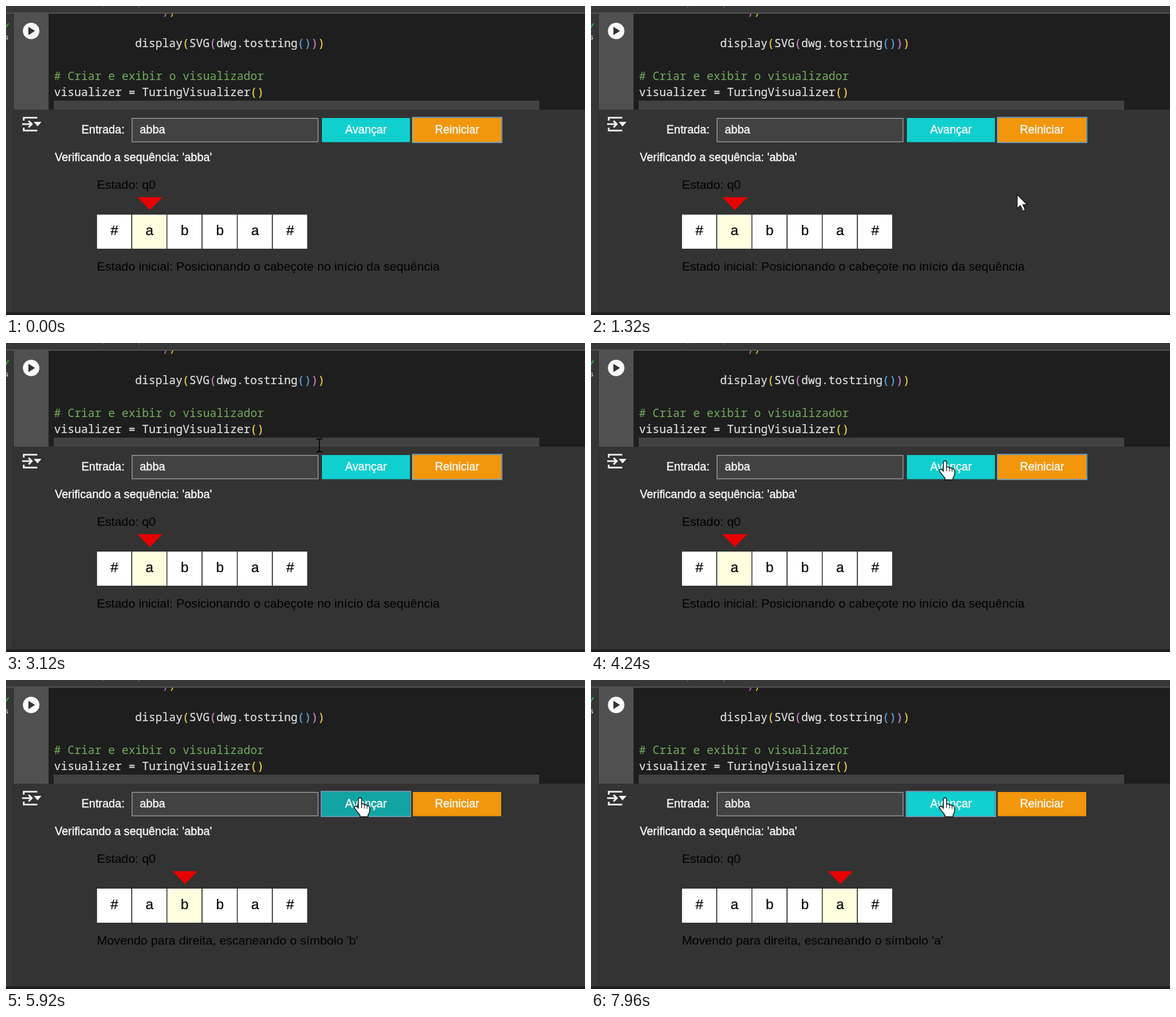
An HTML page for the animation above (8 s loop, 898 by 480 pixels).

```html
<!DOCTYPE html>
<html lang="pt">
<head>
<meta charset="utf-8">
<title>Turing machine</title>
<style>
  html, body { margin: 0; width: 100%; height: 100%; overflow: hidden; background: #333; }
  svg { display: block; width: 100vw; height: 100vh; }
  text { white-space: pre; }
  .code { font: 17.5px "Noto Sans Mono", "DejaVu Sans Mono", monospace; fill: #e2e2e2; }
  .ui { font: 17.7px "Liberation Sans", Arial, sans-serif; fill: #fafafa; }
  .ui text { stroke: #fafafa; stroke-width: .35; }
  .tape { font: 19.1px "Liberation Sans", Arial, sans-serif; fill: #000; }
  .cell { font-size: 21.8px; text-anchor: middle; stroke: #000; stroke-width: .2; }
  .mid { text-anchor: middle; }
  .y { fill: #ffd21f; } .p { fill: #d06fd0; } .b { fill: #3d9be8; } .g { fill: #72ad5c; }
</style>
</head>
<body>
<svg viewBox="0 0 898 480" preserveAspectRatio="none">
  <defs><clipPath id="editor"><rect x="66" y="12" width="832" height="149"/></clipPath></defs>
  <rect width="898" height="480" fill="#333"/>
  <rect width="11" height="480" fill="#363636"/>
  <rect x="11" y="11" width="1" height="465" fill="#2a2a2a"/>
  <rect width="898" height="10" fill="#383838"/>
  <rect y="10" width="898" height="2" fill="#505050"/>
  <path d="M151 0l-2 2M206 0v3" stroke="#777"/>
  <rect x="12" y="12" width="54" height="149" fill="#505050"/>
  <rect x="66" y="12" width="832" height="149" fill="#1e1e1e"/>
  <rect x="74" y="147" width="753" height="14" fill="#424242"/>
  <rect y="476" width="898" height="4" fill="#211d1f"/>
  <path d="M-2 31L0 33 4 27" fill="none" stroke="#2fae4a" stroke-width="2"/>
  <text class="ui" x="-2" y="52" style="font-size:11px">s</text>

  <circle cx="39" cy="38.700" r="12.800" fill="#fafafa"/>
  <path d="M34.700 32.200v13l10.300-6.500z" fill="#333"/>
  <g fill="none" stroke="#f4f4f4" stroke-width="2.600">
    <path d="M27.500 178v-4.500h21M27.500 189v4.500h21M25 183.500h15M35 178.500l5 5-5 5"/>
  </g>
  <path d="M43 180h12l-6 7z" fill="#f4f4f4"/>

  <g class="code" clip-path="url(#editor)">
    <text x="242" y="13.500"><tspan class="p">)</tspan><tspan class="y">)</tspan></text>
    <text x="200.300" y="64" stroke="#e2e2e2" stroke-width=".2">display<tspan class="y">(</tspan>SVG<tspan class="p">(</tspan>dwg.tostring<tspan class="b">()</tspan><tspan class="p">)</tspan><tspan class="y">)</tspan></text>
    <text class="g" x="74.500" y="114.500">#&#32;Criar e exibir o visualizador</text>
    <text x="74.500" y="140" stroke="#e2e2e2" stroke-width=".2">visualizer = TuringVisualizer<tspan class="y">()</tspan></text>
  </g>

  <g class="ui">
    <text x="117" y="198">Entrada:</text>
    <rect x="195.500" y="174.500" width="288.500" height="36.500" fill="#424242" stroke="#a0a0a0" stroke-width="1.200"/>
    <text x="207.500" y="198">abba</text>
    <rect id="step" x="490" y="174" width="136.500" height="37.500"/>
    <rect x="631" y="174" width="137" height="37.500" fill="#f2960b"/>
    <rect id="focus" y="173" width="138.500" height="39" fill="none" stroke="#7fb4d6" stroke-width="1.400"/>
    <text class="mid" x="558.300" y="198">Avançar</text>
    <text class="mid" x="699.600" y="198">Reiniciar</text>
    <text x="75.700" y="241">Verificando a sequência: 'abba'</text>
  </g>

  <g class="tape">
    <text x="140.900" y="284">Estado: q0</text>
    <path id="head" d="M-19.500 297h39L0 317z" fill="#e80000"/>
    <g id="cells"></g>
    <text id="note" x="140.900" y="411"></text>
  </g>

  <path id="arrow" d="M0 0V21.500L5 17 8.700 25.500 12.500 24 8.900 15.500H15.500Z" fill="#fff" stroke="#111" stroke-width="1.200"/>
  <path id="beam" d="M-5-10h4l1 1 1-1h4M0-9V9M-5 10h4l1-1 1 1h4" fill="none" stroke="#000" stroke-width="1.500"/>
  <g id="hand" stroke="#111">
    <path d="M-2.500 2.500Q-2.500 0 0 0T2.500 2.500V10Q6 8.500 7 11 10 10 11 12.500 15 12 15 15.500V21Q14.500 24 12.500 26.500V29.500H0V27L-8 17Q-9.500 13.500-6.500 13-4.500 13-2.500 16Z" fill="#fff" stroke-width="1.300"/>
    <path d="M2.500 10v6M7 11v5.500M11 12.500v4.500"/>
  </g>
</svg>
<script>
const LOOP = 8000, X0 = 140.5, CELL = 54.55;
const tape = [...'#abba#'];
const presses = [4760, 5840, 6840];
const HOLD = 140, LAG = 60;
// Pointer stops: time, x, y
const stops = [[1000, 661, 293], [2300, 661, 293], [3050, 486, 159], [3250, 486, 159], [3850, 549, 183]];
const $ = id => document.getElementById(id);

function add(parent, tag, attrs, label = '') {
  const el = document.createElementNS(parent.namespaceURI, tag);
  for (const k in attrs) el.setAttribute(k, attrs[k]);
  el.textContent = label;
  return parent.appendChild(el);
}

const boxes = tape.map((symbol, i) => {
  const x = X0 + i * CELL;
  const box = add($('cells'), 'rect', { x, y: 323.4, width: CELL, height: 54.3, stroke: '#303030', 'stroke-width': 1.3 });
  add($('cells'), 'text', { class: 'cell', x: x + CELL / 2 + .3, y: 356 }, symbol);
  return box;
});

function pointerAt(t) {
  const i = stops.findIndex(s => s[0] > t);
  if (i < 0) return stops[stops.length - 1].slice(1);
  const [t0, x0, y0] = stops[Math.max(0, i - 1)], [t1, x1, y1] = stops[i];
  const k = Math.max(0, Math.min(1, (t - t0) / (t1 - t0 || 1)));
  const e = k * k * (3 - 2 * k);
  return [x0 + (x1 - x0) * e, y0 + (y1 - y0) * e];
}

function cursorKind(t, x, y) {
  if (t < stops[0][0]) return '';
  if (y > 173 && y < 212 && x > 489 && x < 769) return 'hand';
  return y < 161 ? 'beam' : 'arrow';
}

function draw(t) {
  const pos = 1 + presses.filter(p => t >= p + HOLD + LAG).length;
  const down = presses.some(p => t >= p && t < p + HOLD);
  $('step').setAttribute('fill', down ? '#12a4a4' : '#10cfcf');
  $('focus').setAttribute('x', t >= presses[0] ? 489 : 630.5);
  $('head').setAttribute('transform', `translate(${X0 + (pos + .5) * CELL + .8} 0)`);
  boxes.forEach((box, i) => box.setAttribute('fill', i === pos ? '#ffffe0' : '#fff'));
  $('note').textContent = pos === 1
    ? 'Estado inicial: Posicionando o cabeçote no início da sequência'
    : `Movendo para direita, escaneando o símbolo '${tape[pos]}'`;

  const [x, y] = pointerAt(t), kind = cursorKind(t, x, y);
  for (const id of ['arrow', 'beam', 'hand']) {
    $(id).style.display = id === kind ? '' : 'none';
    $(id).setAttribute('transform', `translate(${x} ${y})`);
  }
}

function tick() {
  draw(performance.now() % LOOP);
  requestAnimationFrame(tick);
}
tick();
</script>
</body>
</html>
```
